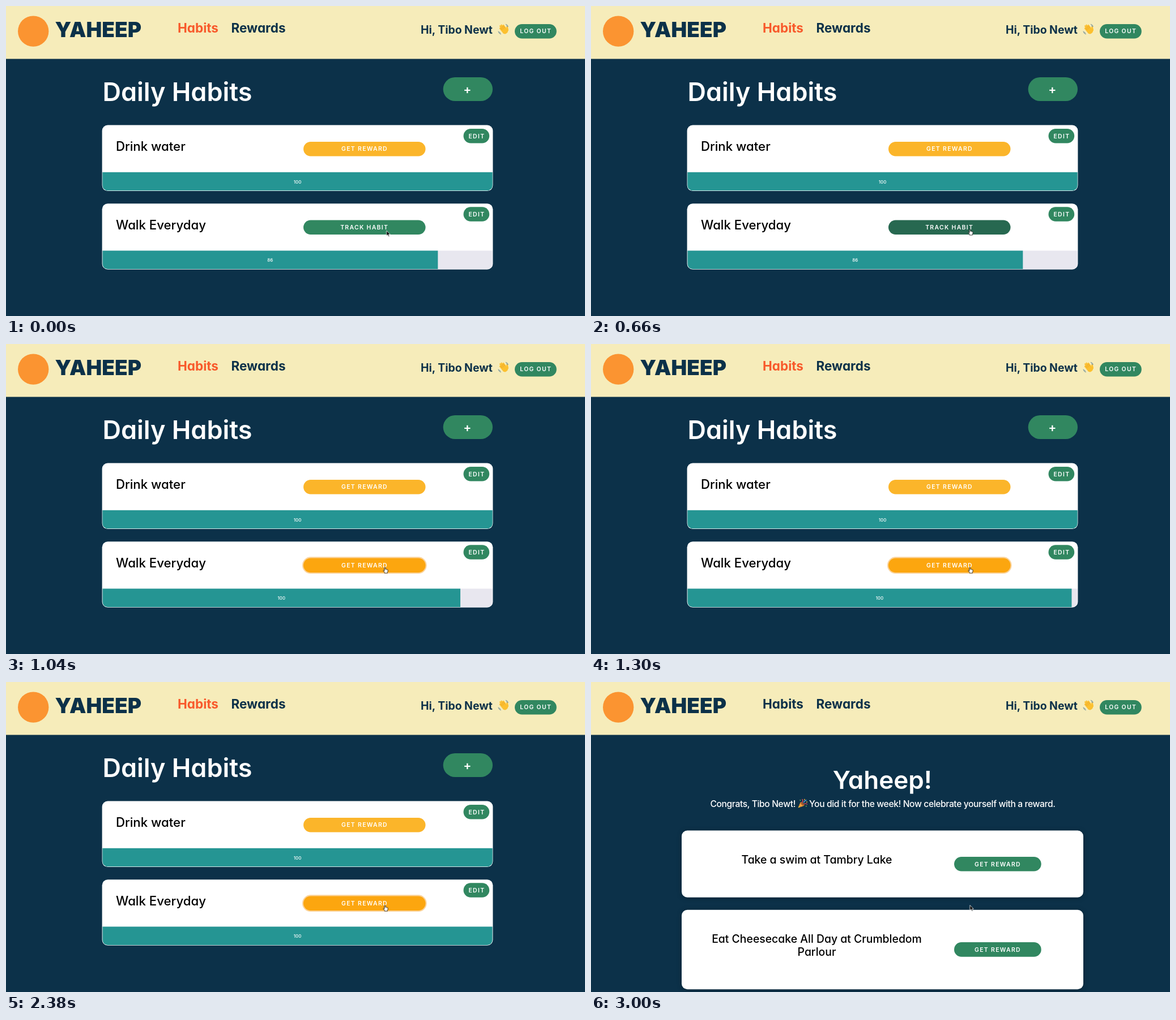
Animation of 1022 by 548 pixels, one loop 3.02 s. Source, as an HTML page:

```html
<!DOCTYPE html>
<html lang="en">
<head>
<meta charset="utf-8">
<title>Daily Habits</title>
<style>
  html, body { margin: 0; width: 100%; height: 100%; overflow: hidden; background: #0c3149; }
  svg { display: block; width: 100%; height: 100%; }
  text { font-family: Inter, "Open Sans", sans-serif; font-feature-settings: "cv11"; }
  .brand { font-size: 37px; font-weight: 900; fill: #0c3149; }
  .nav { font-size: 22.5px; font-weight: 700; fill: #0c3149; }
  .hello { font-size: 19.4px; font-weight: 700; fill: #0c3149; }
  .title { font-size: 45px; font-weight: 600; fill: #fff; }
  .habit { font-size: 22.2px; font-weight: 500; fill: #000; }
  .reward { font-size: 19.4px; font-weight: 550; fill: #000; text-anchor: middle; }
  .lead { font-size: 15.6px; font-weight: 500; fill: #fff; letter-spacing: -.37px; font-feature-settings: normal; }
  .caps { font-size: 10.4px; font-weight: 600; fill: #fff; letter-spacing: 1.35px; text-anchor: middle; }
  .count { font-size: 7.9px; font-weight: 500; fill: #fff; text-anchor: middle; }
  .green { fill: #318760; }
  .teal { fill: #259593; }
  .card { fill: #fff; }
  .lift { filter: drop-shadow(0 1px 4px rgba(0, 0, 0, .3)); }
</style>
</head>
<body>
<svg viewBox="0 0 1022 548" preserveAspectRatio="none">
  <defs>
    <clipPath id="inner"><rect x="170.3" y="211.3" width="688.4" height="115" rx="9.3"/></clipPath>
    <clipPath id="inner2"><rect x="170.3" y="350" width="688.4" height="115" rx="9.3"/></clipPath>
  </defs>
  <rect width="1022" height="548" fill="#0c3149"/>
  <rect width="1022" height="93.5" fill="#f6ecba"/>
  <circle cx="48.2" cy="44.6" r="27.2" fill="#fb9431"/>
  <text class="brand" x="86.5" y="55">YAHEEP</text>
  <text class="nav" id="navHabits" x="303" y="46.5">Habits</text>
  <text class="nav" x="397.5" y="46.5">Rewards</text>
  <text class="hello" x="732" y="48.5">Hi, Tibo Newt</text>

  <g transform="translate(878.3 41.5)" fill="none" stroke-linecap="round">
    <g transform="rotate(-38)" stroke="#fcc02f">
      <path d="M-3.6 1V-5.5M-1 0V-8.5M1.7 0V-8.3M4.2 1V-6" stroke-width="2.5"/>
      <path d="M5 5.5L7.5 .5" stroke-width="2.8"/>
      <rect x="-4.8" y="-1.5" width="10.2" height="10" rx="4.4" fill="#fcc02f" stroke="none"/>
      <path d="M-2.3 -1V-5M.4 -1V-6.5M3 -1V-5.5" stroke="#d98a1d" stroke-width=".5"/>
    </g>
    <path d="M4 -9.2Q7.2 -8.6 8 -5.2M5.2 -7Q6.3 -6.4 6.5 -5M-9.3 3.5Q-8.6 7.4 -5 8.4M-7.5 4.5Q-7 6 -5.5 6.6" stroke="#5a7f96" stroke-width=".9"/>
  </g>
  <rect class="green" x="898" y="32" width="73.8" height="25.6" rx="12.8"/>
  <text class="caps" x="935.2" y="48.3">LOG OUT</text>

  <g id="habits">
    <text class="title" x="170.5" y="167.5">Daily Habits</text>
    <rect class="green" x="771.6" y="126" width="87.4" height="42" rx="21"/>
    <text x="814.3" y="154.6" text-anchor="middle" font-size="21" font-weight="600" fill="#fff">+</text>

    <rect class="card" x="169.6" y="210.6" width="689.8" height="116.5" rx="10"/>
    <rect class="teal" x="170" y="293.8" width="689" height="33" clip-path="url(#inner)"/>
    <text class="count" x="514.5" y="313.7">100</text>
    <text class="habit" x="194" y="256">Drink water</text>
    <rect x="525" y="240" width="215.5" height="25.5" rx="12.75" fill="#fbb52a"/>
    <text class="caps" x="633" y="256.3">GET REWARD</text>
    <rect class="green" x="807.5" y="217" width="45.7" height="25.4" rx="12.7"/>
    <text class="caps" x="830.9" y="233.6">EDIT</text>

    <rect class="card" x="169.6" y="349.2" width="689.8" height="116.5" rx="10"/>
    <g clip-path="url(#inner2)">
      <rect x="170" y="432.5" width="689" height="33" fill="#e8e7ef"/>
      <rect class="teal" id="bar" x="170.3" y="432.5" width="592" height="33"/>
    </g>
    <g id="count">
      <text class="count before" x="170.3" y="452">86</text>
      <text class="count after" x="170.3" y="452">100</text>
    </g>
    <text class="habit" x="194" y="394.5">Walk Everyday</text>
    <rect id="ring" x="522.9" y="376.3" width="219.7" height="29.7" rx="14.85"/>
    <rect id="track" x="525" y="378.4" width="215.5" height="25.5" rx="12.75"/>
    <text class="caps before" x="632.7" y="394.9">TRACK HABIT</text>
    <text class="caps after" x="633" y="394.9">GET REWARD</text>
    <rect class="green" x="807.5" y="355.3" width="45.7" height="25.4" rx="12.7"/>
    <text class="caps" x="830.9" y="371.9">EDIT</text>
  </g>

  <g id="rewards">
    <text class="title" x="514.3" y="189" text-anchor="middle" style="font-size:44px">Yaheep!</text>
    <text class="lead" x="361" y="220.5" text-anchor="end">Congrats, Tibo Newt!</text>
    <g transform="translate(365.5 206.5)">
      <path d="M0 16L4.5 5.5Q9.5 7 11 12Z" fill="#f6bd3a"/>
      <path d="M2 11.5L5.5 14M3.4 8.2L8.5 12.9" stroke="#d8663a" stroke-width="1.2"/>
      <ellipse cx="7.8" cy="8.7" rx="1.7" ry="4.3" transform="rotate(-45 7.8 8.7)" fill="#9a5a2b"/>
      <g fill="none" stroke-width="1.4" stroke-linecap="round">
        <path d="M7 6.5Q9.5 4 7.5 1" stroke="#e6485d"/>
        <path d="M10 6.5Q11 3.5 14.5 2.5" stroke="#4aa3e0"/>
        <path d="M10.5 9Q13 7.5 16 9.5" stroke="#e6485d"/>
      </g>
      <g fill="#f6bd3a"><circle cx="11.5" cy="1.2" r="1"/><circle cx="15.5" cy="5.8" r="1"/></g>
      <g fill="#62b85c"><circle cx="3.8" cy="2.5" r="1"/><circle cx="14.3" cy="13" r="1"/></g>
    </g>
    <text class="lead" x="385" y="220.5">You did it for the week! Now celebrate yourself with a reward.</text>

    <rect class="card lift" x="160" y="262.6" width="709" height="118.2" rx="10"/>
    <text class="reward" x="398.5" y="321">Take a swim at Tambry Lake</text>
    <rect class="green" x="641" y="308.9" width="153.7" height="25.7" rx="12.85"/>
    <text class="caps" x="718" y="325.5">GET REWARD</text>

    <rect class="card lift" x="160" y="402.7" width="709" height="140.6" rx="10"/>
    <text class="reward" x="398.5" y="461">Eat Cheesecake All Day at Crumbledom</text>
    <text class="reward" x="398.5" y="483.5">Parlour</text>
    <rect class="green" x="641" y="460.1" width="153.7" height="25.7" rx="12.85"/>
    <text class="caps" x="718" y="476.7">GET REWARD</text>
  </g>

  <g id="cursor" stroke-linejoin="round">
    <path id="arrow" d="M0 0V9.2L2.1 7.2L3.6 10.6L5.2 9.9L3.7 6.7H6.5Z" fill="#000" stroke="#fff" stroke-width=".8"/>
    <path id="hand" d="M-.9 .6Q0 -.5 .9 .6V3.7Q1.8 3 2.5 4Q3.4 3.5 4 4.5Q5.4 4.2 5.4 5.8Q5.4 8 4.4 9V10.6H-.6V9.3L-3 6.2Q-2.8 4.8 -.9 6.4Z" fill="#fff" stroke="#000" stroke-width=".8"/>
  </g>
</svg>
<script>
  const LOOP = 3020, HOVER = 40, PRESS = 740, DONE = 860, LEAVE = 2390;
  const FADE = 180, FILL = 720;
  const GREEN = '#318760', DARK = '#276850', ORANGE = '#fca60f', NAVY = '#0c3149';

  // Rows are [ms, value, easing to the next row]; the ends are held.
  function play(selector, property, rows) {
    const last = rows[rows.length - 1];
    const frames = [[0, rows[0][1]], ...rows, [LOOP, last[1]]].map(
      ([ms, value, easing = 'linear']) => ({ offset: ms / LOOP, [property]: value, easing }));
    document.querySelectorAll(selector).forEach(
      el => el.animate(frames, { duration: LOOP, iterations: Infinity }));
  }

  // Hard visibility changes: visible only from one time up to another.
  function show(selector, from, to) {
    const rows = [[0, from > 0 ? 0 : 1, 'step-end']];
    if (from > 0) rows.push([from, 1, 'step-end']);
    if (to < LOOP) rows.push([to, 0, 'step-end']);
    play(selector, 'opacity', rows);
  }

  show('#habits', 0, LEAVE);
  show('#rewards', LEAVE, LOOP);
  show('.before', 0, DONE);
  show('.after', DONE, LOOP);
  show('#hand', HOVER, LEAVE);
  play('#arrow', 'opacity', [[0, 1, 'step-end'], [HOVER, 0, 'step-end'], [LEAVE, 1, 'step-end']]);

  play('#navHabits', 'fill', [[0, '#f8592b', 'step-end'], [LEAVE, NAVY, 'step-end']]);
  play('#cursor', 'transform', [
    [0, 'translate(671.7px, 397.2px)', 'ease-out'],
    [160, 'translate(668.8px, 394.5px)']]);
  play('#track', 'fill', [
    [HOVER, GREEN, 'ease-in-out'], [HOVER + FADE, DARK],
    [DONE, DARK, 'ease-in-out'], [DONE + FADE, ORANGE]]);
  play('#ring', 'fill', [
    [PRESS, '#98c3b000', 'ease-in-out'], [DONE, '#98c3b0'],
    [DONE, '#98c3b0', 'ease-in-out'], [DONE + FADE, '#fbd39a']]);
  play('#bar', 'width', [[DONE, '592px', 'ease'], [DONE + FILL, '688.4px']]);
  play('#count', 'transform', [
    [DONE, 'translateX(296px)', 'ease'], [DONE + FILL, 'translateX(344.2px)']]);
</script>
</body>
</html>
```
